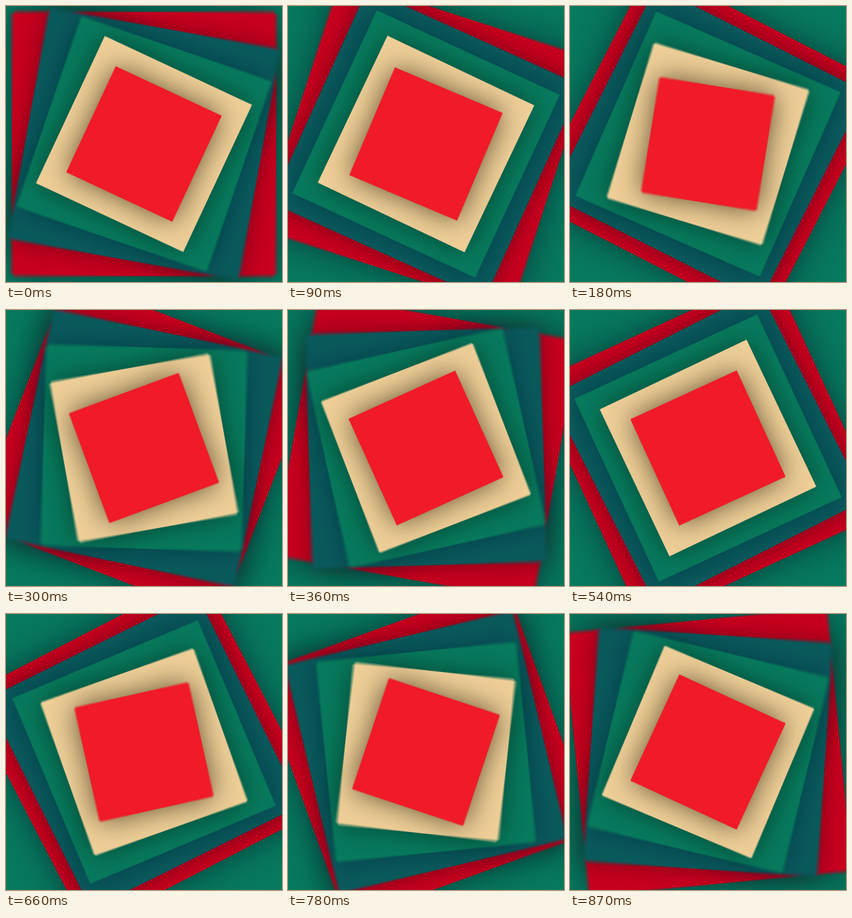
These frames come from a looping animation (400 px wide and 400 px high, 0.9 s). An HTML page with a canvas:

```html
<!DOCTYPE html>
<html lang="en">
<head>
<meta charset="utf-8">
<title>Swinging squares</title>
<style>
  html, body { margin: 0; width: 100%; height: 100%; overflow: hidden; background: #087a5d; }
  canvas { display: block; width: 400px; height: 400px; }
</style>
</head>
<body>
<canvas id="stage" width="400" height="400"></canvas>
<script>
const LOOP = 900, STEP = 30, SHUTTER = 12, SAMPLES = 7;

const sine = x => Math.sin(Math.min(1, x) * Math.PI / 2);
const cubic = x => 1 - Math.pow(1 - Math.min(1, x), 3);

// up, down: times at which the angle passes zero
// reach: time from zero to full swing [before up, after up, around down]
const rings = [
  { half: 191.5, fill: '#c9001f', amp: 27.4, up: 900, down: 405, reach: [232, 198, 188], ease: sine, blur: 52, shade: 'rgba(0,35,50,.62)' },
  { half: 170,   fill: '#0a5a5c', amp: 26.8, up: 853, down: 353, reach: [218, 190, 180], ease: sine, blur: 32, shade: 'rgba(50,0,15,.45)' },
  { half: 146,   fill: '#087a5d', amp: 24.8, up: 810, down: 307, reach: [202, 164, 157], ease: sine, blur: 32, shade: 'rgba(0,50,65,.55)' },
  { half: 117.8, fill: '#efcf98', amp: 25.4, up: 755, down: 257, reach: [170, 162, 165], ease: sine, blur: 36, shade: 'rgba(0,50,40,.65)' },
  { half: 84.8,  fill: '#f01a28', amp: 25,   up: 704, down: 210, reach: [212, 212, 212], ease: cubic, blur: 38, shade: 'rgba(45,35,15,.72)' }
];

const mod = (a, n) => ((a % n) + n) % n;

function angle(r, t) {
  const sinceUp = mod(t - r.up, LOOP), sinceDown = mod(t - r.down, LOOP);
  const toUp = LOOP - sinceUp, toDown = LOOP - sinceDown;
  const [before, after, around] = r.reach;
  const rising = sinceUp < sinceDown;
  const swing = rising
    ? Math.min(r.ease(sinceUp / after), r.ease(toDown / around))
    : -Math.min(r.ease(sinceDown / around), r.ease(toUp / before));
  return r.amp * swing * Math.PI / 180;
}

const view = document.getElementById('stage').getContext('2d');
const layer = document.createElement('canvas');
layer.width = layer.height = 400;
const pen = layer.getContext('2d');

function paint(t) {
  pen.fillStyle = '#087a5d';
  pen.fillRect(0, 0, 400, 400);
  for (const r of rings) {
    pen.save();
    pen.translate(200, 200);
    pen.rotate(angle(r, t));
    pen.shadowColor = r.shade;
    pen.shadowBlur = r.blur;
    pen.fillStyle = r.fill;
    pen.fillRect(-r.half, -r.half, 2 * r.half, 2 * r.half);
    pen.restore();
  }
}

// Average several moments to get motion blur
function render(t) {
  for (let i = 0; i < SAMPLES; i++) {
    paint(t + SHUTTER * (i / (SAMPLES - 1) - 0.5));
    view.globalAlpha = 1 / (i + 1);
    view.drawImage(layer, 0, 0);
  }
}

const start = performance.now();
let shown = -1;

function tick() {
  const t = Math.floor(mod(performance.now() - start, LOOP) / STEP) * STEP;
  if (t !== shown) render(shown = t);
  requestAnimationFrame(tick);
}
tick();
</script>
</body>
</html>
```
